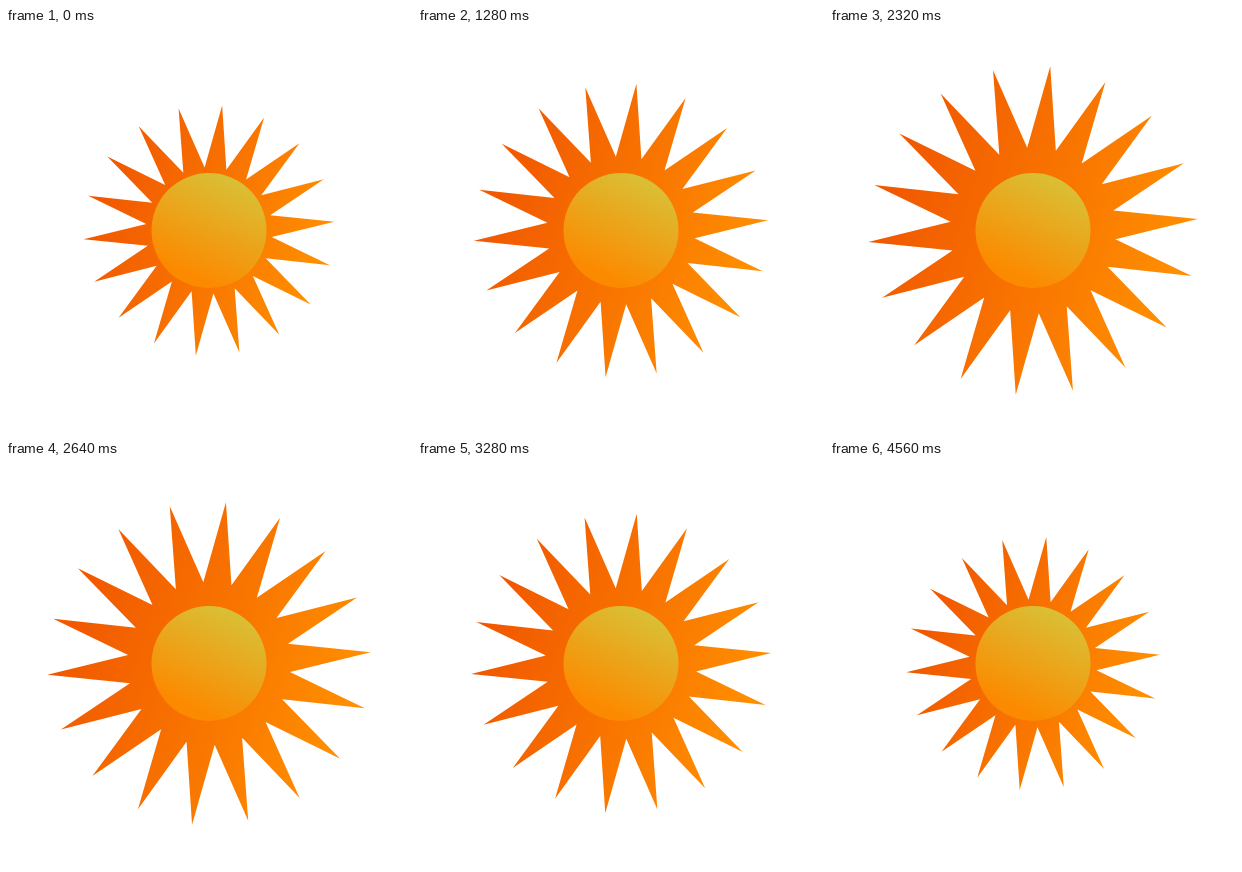
Write an HTML page that moves like this. It is 406 by 405 pixels and loops after 4640 ms.

```html
<!DOCTYPE html>
<html lang="en">
<head>
<meta charset="utf-8">
<title>Pulsing sun</title>
<style>
html, body { margin: 0; width: 100%; height: 100%; overflow: hidden; background: #fff; }
svg { display: block; width: 100%; height: 100%; }
</style>
</head>
<body>
<svg viewBox="0 0 406 405">
  <defs>
    <linearGradient id="flame" gradientUnits="userSpaceOnUse" x1="-0.85" y1="-0.28" x2="0.85" y2="0.28">
      <stop offset="0" stop-color="#f15800"/>
      <stop offset="1" stop-color="#ff8e00"/>
    </linearGradient>
    <linearGradient id="glow" gradientUnits="userSpaceOnUse" x1="27" y1="-52" x2="-19" y2="44">
      <stop offset="0" stop-color="#d9c036"/>
      <stop offset="1" stop-color="#fc8a00"/>
    </linearGradient>
  </defs>
  <g transform="translate(203 202.5)">
    <polygon id="rays" fill="url(#flame)"/>
    <circle r="57.5" fill="url(#glow)"/>
  </g>
</svg>
<script>
const LOOP = 4640, PEAK = 2400, FRAME = 80;
const SMALL = 125.7, LARGE = 166.5;
const RAYS = 18, INNER = 0.502, TILT = 6;
const rays = document.getElementById('rays');

// Unit star: tips and valleys alternate, angles clockwise from the top.
const points = Array.from({ length: RAYS * 2 }, (_, i) => {
  const angle = (TILT + i * 180 / RAYS) * Math.PI / 180;
  const r = i % 2 ? INNER : 1;
  return [r * Math.sin(angle), -r * Math.cos(angle)].map(v => v.toFixed(5)).join();
});
rays.setAttribute('points', points.join(' '));

function draw(now) {
  const t = Math.floor(now % LOOP / FRAME) * FRAME;
  const k = t < PEAK ? t / PEAK : (LOOP - t) / (LOOP - PEAK);
  rays.setAttribute('transform', `scale(${SMALL + (LARGE - SMALL) * k})`);
}

const start = performance.now();
function tick() {
  draw(performance.now() - start);
  requestAnimationFrame(tick);
}
tick();
</script>
</body>
</html>
```
